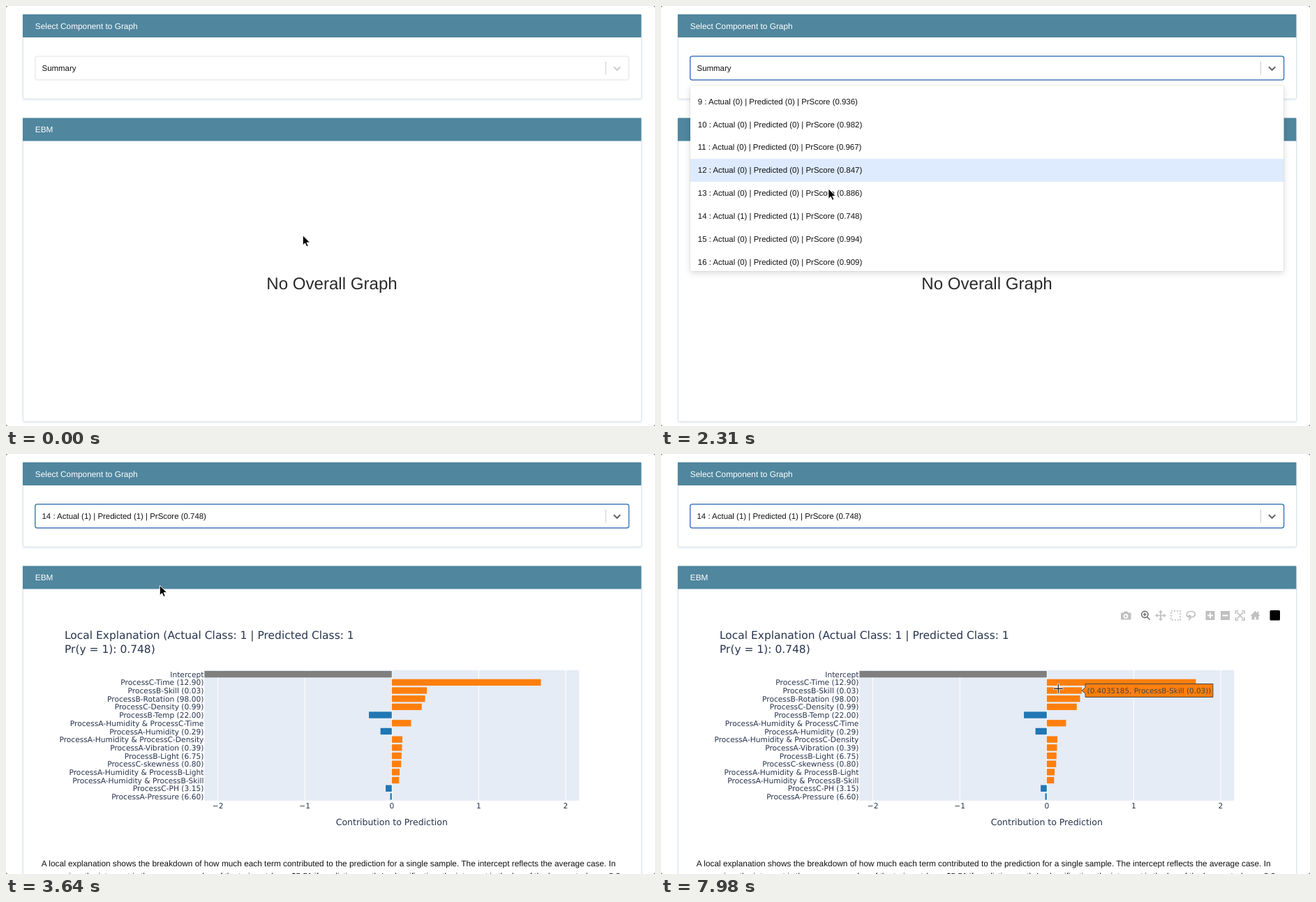
Animation, 930 px wide and 602 px high, one loop 8000 ms. Source, as an HTML page:

```html
<!DOCTYPE html>
<html lang="en">
<head>
<meta charset="utf-8">
<title>Component explanation</title>
<style>
  html, body { margin: 0; width: 100%; height: 100%; overflow: hidden; background: #555; }
  svg { display: block; width: 930px; height: 602px; background: #fff; border-radius: 3px; }
  text { font-family: "Liberation Sans", Arial, sans-serif; font-size: 11.85px; fill: #111; white-space: pre; text-rendering: geometricPrecision; }
  .card { fill: #fff; stroke: #dae6ec; filter: drop-shadow(0 1px 1.5px rgba(80, 134, 158, .2)); }
  .head { fill: #50869e; }
  .title { fill: #fff; }
  .opt, #value { font-size: 11.45px; }
  #empty { font-size: 24.1px; fill: #2a2a2a; text-anchor: middle; }
  #chart text, #tip text { font-family: "DejaVu Sans", Verdana, sans-serif; font-size: 10.67px; fill: #26344d; }
  #chart .big { font-size: 15.47px; }
  #chart .axis { font-size: 12.5px; }
  #chart .note { font: 11.85px "Liberation Sans", Arial, sans-serif; fill: #111; }
  #tip text { font-size: 10.45px; fill: #444; }
  #tip path { fill: #ff7f0e; stroke: #444; }
  .end { text-anchor: end; }
  .mid { text-anchor: middle; }
  .menu { fill: #fff; stroke: rgba(0, 0, 0, .1); filter: drop-shadow(0 3px 4px rgba(0, 0, 0, .14)); }
  .line { fill: none; stroke: #444; stroke-width: 1.7; }
</style>
</head>
<body>
<svg viewBox="0 0 930 602">
  <defs><clipPath id="list"><rect x="42" y="113.5" width="850.5" height="266.5" rx="3"/></clipPath></defs>
  <rect class="card" x="24.5" y="12" width="886" height="121" rx="2"/>
  <rect class="head" x="24" y="12" width="886.3" height="33"/>
  <text class="title" x="41.8" y="32.7">Select Component to Graph</text>
  <rect class="card" id="panel" x="24.5" y="161" width="886" rx="2"/>
  <rect class="head" x="24" y="160.5" width="886.3" height="33"/>
  <text class="title" x="41.8" y="181.2">EBM</text>
  <rect id="control" x="41.8" y="72.1" width="850.8" height="33.8" rx="3" fill="#fff"/>
  <path d="M859.5 79.5v19" stroke="#ccc"/>
  <path id="chevron" d="M870.9 87.3l4.7 4.5 4.7-4.5" fill="none" stroke-width="2"/>
  <text id="value" x="51.5" y="93.2"></text>
  <text id="empty" x="467" y="406">No Overall Graph</text>
  <g id="chart"></g>
  <g id="modebar">
    <g opacity=".33">
      <path fill="#444" fill-rule="evenodd" d="M659 227.5h3.5l1.5-2h4l1.5 2h4v10h-14.5zM666 229a3.5 3.5 0 1 0 .1 0zM666 231a1.6 1.6 0 1 1-.1 0z"/>
      <path class="line" d="M709.5 231.5h13M716 225v13M711.5 229.5l-2 2 2 2M720.5 229.5l2 2-2 2M714 227l2-2 2 2M714 236l2 2 2-2"/>
      <path class="line" stroke-dasharray="2.2 1.8" d="M731 225h13v13h-13z"/>
      <path class="line" d="M756 234c-4-2-4-8 3-8.5 8 0 8 7.5 1 8.5-4 .5-5-2-3-2.5s3 4-1 6.5"/>
      <path fill="#444" fill-rule="evenodd" d="M780.5 225h13v13h-13zM786 227.5v3h-3v2h3v3h2v-3h3v-2h-3v-3z"/>
      <path fill="#444" fill-rule="evenodd" d="M802 225h13v13h-13zM804.5 230.5v2h8v-2z"/>
      <path class="line" d="M823.5 229v-4h4M832 225h4v4M836 234v4h-4M827.5 238h-4v-4M825.5 227l8.5 9M834 227l-8.5 9"/>
      <path fill="#444" d="M844.5 232l7-7 3 3v-2h2v4l2 2h-2v5.5h-4v-4h-2v4h-4v-5.5z"/>
    </g>
    <g opacity=".75"><circle class="line" cx="693.3" cy="230" r="4.6"/><path class="line" d="M696.5 233.5l4 4M691 230h4.6M693.3 227.7v4.6"/></g>
    <rect x="872.5" y="224" width="14.5" height="14.5" rx="1.5"/>
  </g>
  <g id="tip"><path/><text></text></g>
  <g id="menu">
    <rect class="menu" x="42" y="113.5" width="850.5" height="266.5" rx="3"/>
    <g clip-path="url(#list)"><g id="rows"></g></g>
  </g>
  <path id="arrow" d="M0 0V14.3l3.3-3.1 2.2 5.1 2.4-1-2.2-5h4.6z" stroke="#fff" stroke-width=".9"/>
  <g id="cross" fill="none"><path d="M-7 0H7M0-7V7" stroke="#fff" stroke-width="3"/><path d="M-6.5 0h13M0-6.5v13" stroke="#111" stroke-width="1.2"/></g>
</svg>
<script>
const $ = id => document.getElementById(id);
const show = (el, on) => el.style.display = on ? '' : 'none';
const clamp = u => Math.max(0, Math.min(1, u));

// Dropdown options
const ROW = 32.95, TOP = 117;
const scores = [.99, .869, .989, .983, .99, .995, .953, .978, .991, .936, .982, .967,
  .847, .886, .748, .994, .909, .999, .753, .875, .981, .962];
const options = ['Summary', ...scores.map((s, i) => {
  const c = i === 14 ? 1 : 0;
  return `${i} : Actual (${c}) | Predicted (${c}) | PrScore (${s})`;
})];
$('rows').innerHTML = options.map((label, i) =>
  `<rect x="42" y="${TOP + i * ROW}" width="850.5" height="${ROW}"/>
   <text class="opt" x="52.8" y="${TOP + i * ROW + 20.3}" ${i ? '' : 'style="fill:#fff"'}>${label}</text>`).join('');
const optionRects = [...$('rows').querySelectorAll('rect')];

// Bar chart
const X0 = 552.8, UNIT = 124.6, PLOT = { x: 284.3, y: 309.8, w: 537, h: 187 }, BAND = PLOT.h / 16;
const bars = [
  ['Intercept', -2.154], ['ProcessC-Time (12.90)', 1.715276], ['ProcessB-Skill (0.03)', .4035185],
  ['ProcessB-Rotation (98.00)', .3829417], ['ProcessC-Density (0.99)', .345], ['ProcessB-Temp (22.00)', -.263],
  ['ProcessA-Humidity & ProcessC-Time', .222], ['ProcessA-Humidity (0.29)', -.13],
  ['ProcessA-Humidity & ProcessC-Density', .122], ['ProcessA-Vibration (0.39)', .118],
  ['ProcessB-Light (6.75)', .112], ['ProcessC-skewness (0.80)', .108],
  ['ProcessA-Humidity & ProcessB-Light', .09], ['ProcessA-Humidity & ProcessB-Skill', .084],
  ['ProcessC-PH (3.15)', -.07], ['ProcessA-Pressure (6.60)', -.018]];
const px = v => X0 + v * UNIT;
const rowY = i => PLOT.y + (i + .5) * BAND;
const text = (cls, x, y, s) => `<text class="${cls}" x="${x}" y="${y}">${s.replace('&', '&amp;')}</text>`;

$('chart').innerHTML =
  text('big', 84, 265.3, 'Local Explanation (Actual Class: 1 | Predicted Class: 1') +
  text('big', 84, 285.3, 'Pr(y = 1): 0.748)') +
  `<rect x="${PLOT.x}" y="${PLOT.y}" width="${PLOT.w}" height="${PLOT.h}" fill="#e5ecf6"/>` +
  [-2, -1, 0, 1, 2].map(v =>
    `<path d="M${px(v)} ${PLOT.y}v${PLOT.h}" stroke="#fff" stroke-width="${v ? 1 : 1.6}"/>` +
    text('mid', px(v), 508.3, String(v).replace('-', '\u2212'))).join('') +
  bars.map(([name, v], i) => {
    const color = i === 0 ? '#7f7f7f' : v > 0 ? '#ff7f0e' : '#1f77b4';
    return `<rect x="${Math.min(X0, px(v))}" y="${rowY(i) - BAND * .4}" width="${Math.abs(v) * UNIT}" height="${BAND * .8}" fill="${color}"/>` +
      text('end', 283.4, rowY(i) + 4.1, name);
  }).join('') +
  text('axis mid', X0, 532.3, 'Contribution to Prediction') +
  text('note', 50.8, 590.7, 'A local explanation shows the breakdown of how much each term contributed to the prediction for a single sample. The intercept reflects the average case. In') +
  text('note', 50.8, 608.8, 'regression, the intercept is the average y-value of the train set (e.g., $5.51 if predicting cost). In classification, the intercept is the log of the base rate (e.g., -2.3');

// Pointer path: time, x, y
const path = [[0, 425.3, 328.7], [630, 362.7, 88.5], [770, 362.7, 87.7], [1540, 362.7, 87.7], [1890, 266.3, 217.3],
  [2100, 240, 262], [2380, 240, 262], [2590, 219.3, 225], [2870, 219.3, 225], [3010, 219.3, 208], [3290, 220.3, 188.3],
  [4060, 220.3, 188.3], [4270, 222.7, 193], [4620, 222.7, 193], [4970, 227, 201], [5040, 227, 201], [5250, 278.3, 207.7],
  [5740, 278.3, 207.7], [6580, 598, 351], [6720, 600, 329.5], [7420, 600, 329.5], [7980, 569.3, 336.3]];

function pointer(t) {
  const i = Math.max(1, path.findIndex(p => p[0] >= t));
  const [a, b] = [path[i - 1], path[i]];
  const u = clamp((t - a[0]) / (b[0] - a[0])), s = u * u * (3 - 2 * u);
  return [a[1] + (b[1] - a[1]) * s, a[2] + (b[2] - a[2]) * s];
}

const glide = (t, from, to) => 1 - (1 - clamp((t - from) / (to - from))) ** 2;
const scroll = t => 333 * glide(t, 1890, 2380) + 99 * glide(t, 2660, 2940);

function drawMenu(t) {
  const before = t - 70, y = pointer(before)[1];   // hover trails the pointer by one tick
  const hover = y < 113 ? -1 : Math.floor((y - TOP + scroll(before)) / ROW);
  $('rows').setAttribute('transform', `translate(0 ${-scroll(t)})`);
  optionRects.forEach((r, i) => r.setAttribute('fill',
    i === 0 ? '#2684ff' : i !== hover ? '#fff' : t >= 3500 ? '#b2d4ff' : '#deebff'));
}

function drawTip(x, y) {
  const i = Math.floor((y - PLOT.y) / BAND), [name, v] = bars[i] || ['', 0];
  const on = v > 0 && x > X0 && x < px(v);
  show($('tip'), on);
  if (!on) return;
  const [shape, label] = $('tip').children;
  label.textContent = `(${v}, ${name})`;
  const w = label.getComputedTextLength() + 5, end = px(v), cy = rowY(i);
  const dir = end + w + 6 > 885 ? -1 : 1;
  shape.setAttribute('d', `M${end} ${cy}l${5 * dir}-4.5v-5h${w * dir}v19h${-w * dir}v-5z`);
  label.setAttribute('x', (dir > 0 ? end + 5 : end - 5 - w) + 2.5);
  label.setAttribute('y', cy + 4.1);
}

function draw(t) {
  const open = t >= 1190 && t < 3640, chosen = t >= 3640, focus = t >= 1190;
  const [x, y] = pointer(t);
  const inPlot = chosen && x > PLOT.x && x < PLOT.x + PLOT.w && y > PLOT.y;
  $('control').setAttribute('stroke', focus ? '#447bbd' : '#dfe2e6');
  $('control').setAttribute('stroke-width', focus ? 1.5 : 1);
  $('chevron').setAttribute('stroke', focus ? '#666' : '#ccc');
  $('value').textContent = options[chosen ? 15 : 0];
  $('panel').setAttribute('height', chosen ? 480 : 434.7);
  show($('empty'), !chosen);
  show($('chart'), chosen);
  $('modebar').style.opacity = clamp((t - 5810) / 280);
  show($('menu'), open);
  if (open) drawMenu(t);
  drawTip(x, inPlot ? y : 0);
  show($('arrow'), !inPlot);
  show($('cross'), inPlot);
  for (const id of ['arrow', 'cross']) $(id).setAttribute('transform', `translate(${x} ${y})`);
}

function tick() {
  draw(Math.floor(performance.now() % 8000 / 70) * 70);
  requestAnimationFrame(tick);
}
tick();
</script>
</body>
</html>
```
